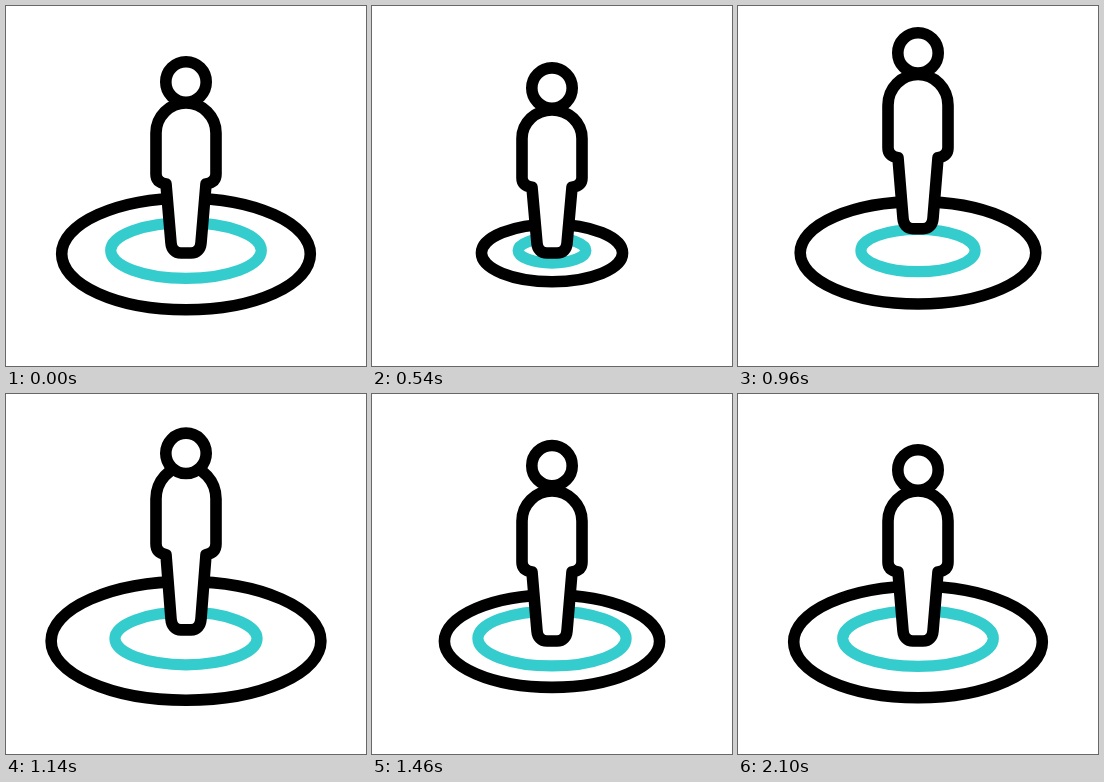
An HTML page that plays this animation: 360 by 360 pixels, repeating every 3000 ms.

```html
<!DOCTYPE html>
<html lang="en">
<head>
<meta charset="utf-8">
<title>Person on a platform</title>
<style>
  html, body { margin: 0; width: 100%; height: 100%; overflow: hidden; background: #fff; }
  svg { display: block; width: 100%; height: 100%; }
</style>
</head>
<body>
<svg viewBox="0 0 360 360" fill="#fff" stroke="#000" stroke-width="11.6" stroke-linejoin="round">
  <ellipse id="outer" cx="180" fill="none"/>
  <ellipse id="inner" cx="180" cy="244.5" fill="none" stroke="#34cccc" stroke-width="11.2"/>
  <path id="body"/>
  <circle id="head" cx="180" r="20.2"/>
</svg>
<script>
const LOOP = 3000;
const GROUND = 247;
const el = id => document.getElementById(id);
const outer = el('outer'), inner = el('inner'), body = el('body'), head = el('head');

const sine = p => (1 - Math.cos(Math.PI * p)) / 2;
const cubic = p => p < 0.5 ? 4 * p ** 3 : 1 - 4 * (1 - p) ** 3;

// Keys are [time, value, easing towards this key].
function track(keys, t) {
  if (t <= keys[0][0]) return keys[0][1];
  for (let i = 1; i < keys.length; i++) {
    const [t0, v0] = keys[i - 1];
    const [t1, v1, ease = sine] = keys[i];
    if (t < t1) return v0 + (v1 - v0) * ease((t - t0) / (t1 - t0));
  }
  return keys[keys.length - 1][1];
}

const headShift = [[100, 0], [430, 15], [820, -33], [1400, -5], [1600, -2], [1860, -9], [2100, 0]];
const bodyStretch = [[100, 1], [420, 0.945], [860, 0.995], [1120, 1.095], [1280, 1]];
const outerRx = [[100, 124.3], [740, 63.2, cubic], [1080, 138.3], [1380, 103.6], [1660, 124.3]];
const outerRy = [[100, 55.8], [740, 25, cubic], [1080, 61], [1380, 43.8], [1660, 55.8]];
const outerY = [[100, 248], [740, 246.7], [1380, 247.1], [1660, 248]];
const innerRx = [[100, 75.3], [740, 28.2, cubic], [1100, 71], [1660, 75.3]];

function jump(t) {
  const p = (t - 910) / 310;
  return Math.abs(p) < 1 ? -25 * (1 - p * p) : 0;
}

function bodyPath(lift, stretch) {
  const y = v => (GROUND + lift + (v - GROUND) * stretch).toFixed(2);
  return `M150 ${y(127)} A30 ${30 * stretch} 0 0 1 210 ${y(127)}
    V${y(168)} C210 ${y(174)} 206 ${y(177)} 200 ${y(178)}
    L195 ${y(237)} C194.5 ${y(243)} 191 ${y(247)} 185 ${y(247)}
    H175 C169 ${y(247)} 165.5 ${y(243)} 165 ${y(237)}
    L160 ${y(178)} C154 ${y(177)} 150 ${y(174)} 150 ${y(168)} Z`;
}

function setAll(node, attrs) {
  for (const name in attrs) node.setAttribute(name, attrs[name]);
}

function draw(t) {
  const rx = track(innerRx, t);
  setAll(outer, { rx: track(outerRx, t), ry: track(outerRy, t), cy: track(outerY, t) });
  setAll(inner, { rx, ry: rx * 0.37 });
  body.setAttribute('d', bodyPath(jump(t), track(bodyStretch, t)));
  head.setAttribute('cy', 76 + track(headShift, t));
}

const start = performance.now();
function frame() {
  draw((performance.now() - start) % LOOP);
  requestAnimationFrame(frame);
}
draw(0);
requestAnimationFrame(frame);
</script>
</body>
</html>
```
